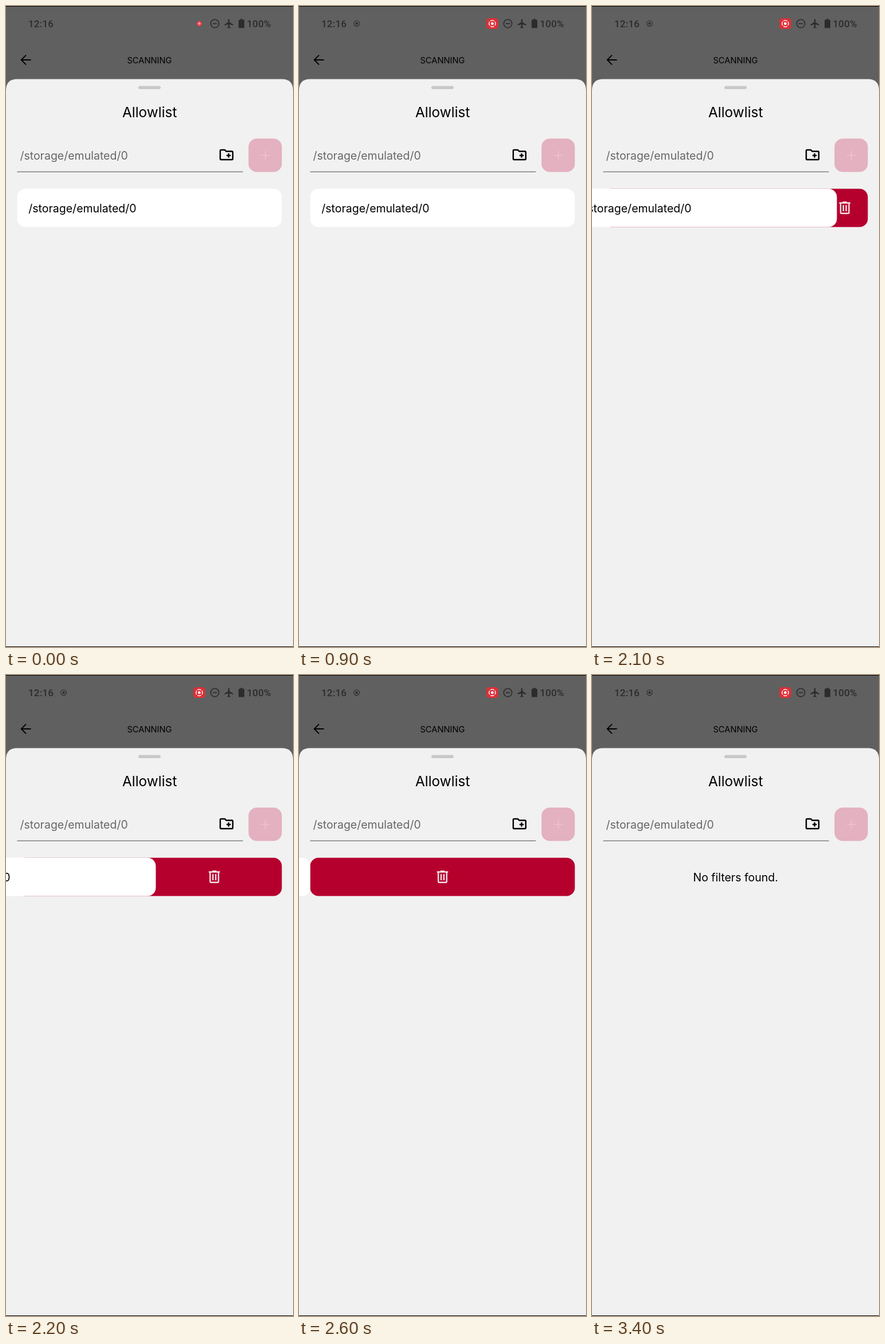
Animation of 501 by 1118 pixels, one loop 3.5 s. Source, as an HTML page:

```html
<!DOCTYPE html>
<html lang="en">
<head>
<meta charset="utf-8">
<title>Allowlist</title>
<style>
  html, body { margin: 0; width: 100%; height: 100%; overflow: hidden; background: #606060; }
  svg { display: block; width: 501px; height: 1118px; }
  text { font-family: Inter, sans-serif; font-size: 19.5px; }
  .status text { font: 500 17px Roboto, sans-serif; letter-spacing: .2px; }
  .line { fill: none; stroke: currentColor; }
</style>
</head>
<body>
<svg viewBox="0 0 501 1118">
  <rect width="501" height="1118" fill="#606060"/>

  <g class="status" fill="#2c2c2c" color="#2c2c2c">
    <text x="39" y="36.5">12:16</text>
    <g id="cast">
      <circle class="line" cx="100.6" cy="30.6" r="4.8" stroke-width="1.1"/>
      <circle cx="100.6" cy="30.6" r="2.2"/>
    </g>
    <g id="chip" color="#fff">
      <rect id="chipBox" x="-10.3" y="-9.4" width="20.6" height="18.8" fill="#dc3039"/>
      <circle class="line" r="5.6" stroke-width="1.4" pathLength="8"
        stroke-dasharray="1.6 .4" stroke-dashoffset=".8"/>
      <circle r="2.4" fill="#fff"/>
    </g>
    <circle class="line" cx="364.5" cy="30.7" r="7.2" stroke-width="1.6"/>
    <path class="line" d="M360.8 30.7h7.4" stroke-width="1.7"/>
    <path transform="translate(379.8 21.1) scale(.8)" d="M21 16v-2l-8-5V3.5c0-.83-.67-1.5-1.5-1.5S10 2.67 10 3.5V9l-8 5v2l8-2.5V19l-2 1.5V22l3.5-1 3.5 1v-1.5L13 19v-5.5l8 2.5z"/>
    <path d="M409 22.5h4v1.6h2q1 0 1 1v12.4q0 1-1 1h-8q-1 0-1-1V25.100q0-1 1-1h2z"/>
    <text x="420.500" y="36.5">100%</text>
  </g>

  <path class="line" d="M43.500 94H27M35 85.700L26.700 94l8.300 8.300" stroke-width="1.9"/>
  <text x="250.500" y="99.500" text-anchor="middle" style="font-size:14.7px">SCANNING</text>

  <path d="M0 1118V147q0-19.500 19.500-19.500h462q19.500 0 19.500 19.500v971z" fill="#f1f1f1"/>
  <rect x="231" y="139.600" width="39" height="5.400" rx="2.700" fill="#c8c8c8"/>
  <text x="250.700" y="193.800" text-anchor="middle" style="font-size:24.4px">Allowlist</text>

  <text x="24.400" y="267.600" fill="#666">/storage/emulated/0</text>
  <path transform="translate(370.300 244.900) scale(1.218)" d="M20 6h-8l-2-2H4c-1.110 0-1.990.890-1.990 2L2 18c0 1.110.890 2 2 2h16c1.110 0 2-.890 2-2V8c0-1.110-.890-2-2-2zm0 12H4V6h5.170l2 2H20v10zm-8-4h2v2h2v-2h2v-2h-2v-2h-2v2h-2v2z"/>
  <rect x="19.500" y="288.600" width="394" height="1.200" fill="#666"/>
  <rect x="423.300" y="231.200" width="58.200" height="58.400" rx="14.600" fill="#e3b1c0"/>
  <path class="line" color="#efc3d2" d="M445 260.500h15.400M452.700 252.800v15.400" stroke-width="1.600"/>

  <g id="row">
    <g id="remove">
      <rect x="19.500" y="318.800" width="462" height="66.700" rx="14.600" fill="#b5002e"/>
      <path id="bin" fill="#f4dfe5" d="M9 3V4H4V6H5V19A2 2 0 0 0 7 21H17A2 2 0 0 0 19 19V6H20V4H15V3H9M7 6H17V19H7V6M9 8V17H11V8H9M13 8V17H15V8H13Z"/>
    </g>
    <g id="card">
      <rect x="19.500" y="318.800" width="462" height="66.700" rx="14.600" fill="#fff"/>
      <text x="39.300" y="359.800">/storage/emulated/0</text>
    </g>
  </g>
  <text id="empty" x="250.700" y="359.800" text-anchor="middle">No filters found.</text>

  <path d="M0 0h501v1H0zM0 1117h501v1H0z"/>
</svg>
<script>
  const LOOP = 3500, STEP = 100, ROW_WIDTH = 462, BIN_WIDTH = 30;
  const SWIPE = [[1900, 0], [2000, 8], [2100, 54], [2200, 220], [2300, 387], [2400, 446], [2500, ROW_WIDTH]];
  const part = id => document.getElementById(id);
  const lerp = (a, b, k) => a + (b - a) * k;
  const progress = (t, from, to) => Math.min(1, Math.max(0, (t - from) / (to - from)));
  const show = (id, on) => part(id).style.display = on ? "" : "none";
  const move = (id, x, y, scale = 1) =>
    part(id).setAttribute("transform", `translate(${x} ${y}) scale(${scale})`);

  function swipeAt(t) {
    const next = SWIPE.findIndex(([time]) => time > t);
    if (next === 0) return 0;
    if (next < 0) return ROW_WIDTH;
    const [t0, x0] = SWIPE[next - 1], [t1, x1] = SWIPE[next];
    return lerp(x0, x1, progress(t, t0, t1));
  }

  function draw(t) {
    const grow = 1 - (1 - progress(t, 0, 300)) ** 2;
    move("chip", 337.4, 30.7, lerp(.48, 1, grow));
    part("chipBox").setAttribute("rx", lerp(9.4, 5, grow));
    part("cast").setAttribute("opacity", progress(t, 0, 300));

    const offset = swipeAt(t);
    const binCenter = 481.5 - lerp(BIN_WIDTH, ROW_WIDTH, offset / ROW_WIDTH) / 2;
    move("card", -offset, 0);
    move("bin", binCenter - 14.6, 337.4, 1.218);
    show("remove", offset > 0);
    show("row", t < 2700);
    show("empty", t >= 2700);
  }

  function tick() {
    draw(Math.floor(performance.now() % LOOP / STEP) * STEP);
    requestAnimationFrame(tick);
  }
  tick();
</script>
</body>
</html>
```
